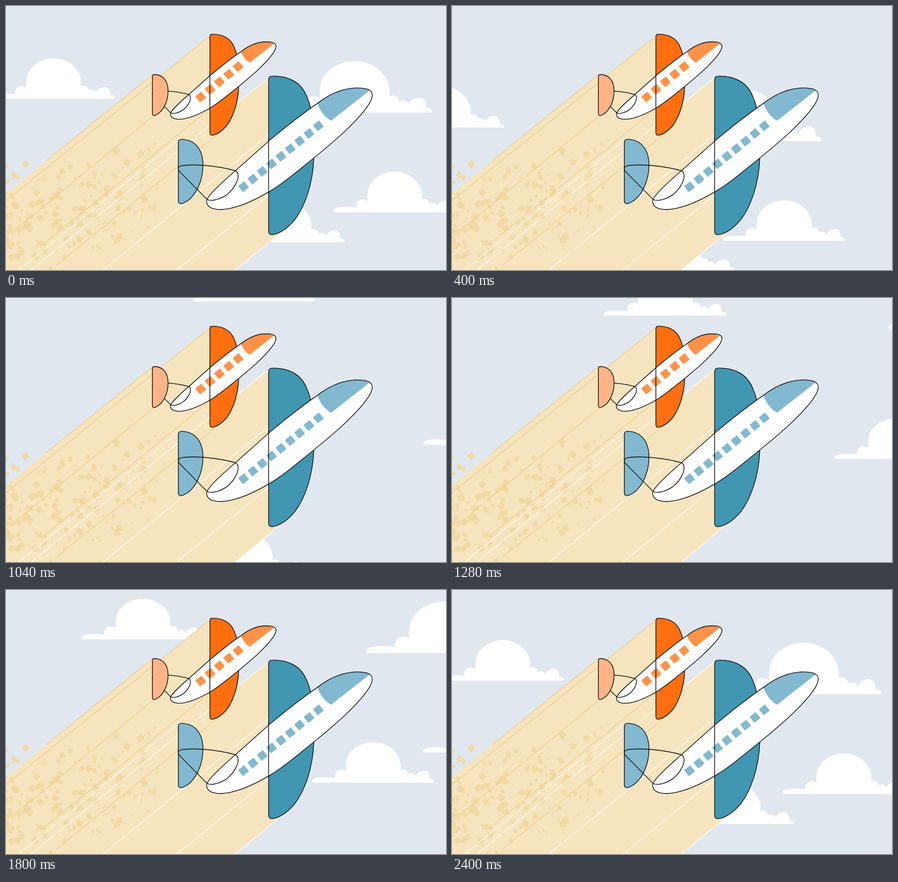
Write an HTML page that moves like this. It is 965x580 px and loops after 2.44 s.

```html
<!DOCTYPE html>
<html lang="en">
<head>
<meta charset="utf-8">
<title>Two planes</title>
<style>
  html, body { margin: 0; width: 100%; height: 100%; overflow: hidden; background: #e0e7ef; }
  svg { display: block; width: 965px; height: 580px; }
  .ink { fill: none; stroke: #111; stroke-linejoin: round; stroke-linecap: round; }
</style>
</head>
<body>
<svg viewBox="0 0 965 580">
  <defs>
    <path id="cloud" fill="#fff" d="M2,0C-1,-1 -1,-6 4,-8C14,-13 36,-12 50,-10C49,-22 56,-29 65,-28Q72,-28 75,-24
      C74,-32 74,-36 75,-42C76,-68 104,-89 135,-89C168,-89 195,-64 195,-36L194,-28C200,-31 210,-29 211,-19
      C217,-22 225,-21 227,-14C231,-22 240,-26 247,-26C256,-25 259,-16 258,-8C264,-9 268,-6 268,-3Q268,0 265,0Z"/>
    <path id="wing" d="M576,162Q576,154 584,154C620,153 647,168 659,197Q665,210 668,224L675,335
      C673,390 656,440 633,470C616,490 601,499 587,502Q576,504 576,494Z"/>
    <path id="tail" d="M378,300Q378,293 385,293C412,293 432,312 432,350C432,383 416,424 386,434Q378,436 378,427Z"/>
    <path id="strut" d="M503,362C470,352 415,346 384,351Q374,355 380,363L443,427"/>
    <path id="body" d="M441,425C447,412 470,391 503,362L577,296C620,260 655,233 683,214C712,191 748,176 785,181
      C800,183 806,190 802,203C796,222 765,255 735,283C715,301 695,318 675,334C640,362 608,390 577,408
      C545,427 515,440 490,445C470,449 445,448 441,434Q439,430 441,425Z"/>
    <path id="nose" d="M683,214C712,191 748,176 785,181Q794,183 797,186L713,252Q692,240 683,214Z"/>
    <path id="seams" d="M441,425C450,430 470,425 485,414C500,402 509,384 509,374Q509,364 503,362M576,290V412"/>
  </defs>
  <g id="clouds"></g>
  <path fill="#f6e4be" d="M447,66L335,157L320,152L0,411V580H503L600,500V300L575,158L447,262Z"/>
  <g id="confetti" fill="#f0d9a3"></g>
  <g fill="none" stroke-width="1.5">
    <path stroke="#eecb85" d="M447,66L0,428M320,152L88,340M325,240L28,485M447,226L80,525M460,285L110,570"/>
    <path stroke="#fffaf0" stroke-width="1.8" d="M575,158L55,580M378,294L28,580M577,282L213,580M577,415L375,580M600,500L503,580"/>
  </g>
  <g id="planes"></g>
</svg>
<script>
const el = id => document.getElementById(id);
const use = (id, attrs = '') => `<use href="#${id}" ${attrs}/>`;
const repeat = (count, draw) => Array.from({ length: count }, (_, i) => draw(i)).join('');
const square = (x, y, size, angle) =>
  `<rect x="${-size / 2}" y="${-size / 2}" width="${size}" height="${size}" transform="translate(${x} ${y}) rotate(${angle})"/>`;

// Clouds: one tile of sky, repeated one loop further along the flight path
const LOOP = 2440, STEP = 40, TILE = [769, -347.5];
const sky = [[-30, 204, 1], [594, 234, 1.27], [718, 453, 1], [475, 519, 1]];
el('clouds').innerHTML = repeat(2, n => sky.map(([x, y, scale]) =>
  use('cloud', `transform="translate(${x + n * TILE[0]} ${y + n * TILE[1]}) scale(${scale})"`)).join(''));

// Confetti: thins out along the trail, densest around its middle
let seed = 11;
const random = () => (seed = seed * 16807 % 2147483647) / 2147483647;
el('confetti').innerHTML = repeat(170, () => {
  const x = 340 * random() ** 1.5;
  const y = 475 - x * .2 + (random() + random() - 1) * 130;
  return square(x, y, 4 + 10 * random() ** 1.5, 90 * random());
});

function plane({ wing, light, tail, windows: { x, y, count }, dx = 0, dy = 0, scale = 1, tailOnTop }) {
  const rear = [use('tail', `fill="${tail}"`), use('strut')];
  if (tailOnTop) rear.reverse();
  const layer = content => `<g class="ink" stroke-width="${1.6 / scale}"
    transform="translate(${dx} ${dy}) scale(${scale})">${content}</g>`;
  return layer(use('wing', `fill="${wing}"`) + rear.join('') + use('body', 'fill="#fff" stroke="none"') +
      use('nose', `fill="${light}" stroke="none"`)) +
    `<g fill="${light}">${repeat(count, i => square(x + i * 20.5, y - i * 16.7, 17, -39))}</g>` +
    layer(use('body') + use('seams'));
}
el('planes').innerHTML =
  plane({ wing: '#ff6f0f', light: '#ff9249', tail: '#ffb488', windows: { x: 427, y: 200, count: 5 },
    dx: 80.3, dy: -36, scale: .637, tailOnTop: true }) +
  plane({ wing: '#4196b2', light: '#82b9d0', tail: '#82b9d0', windows: { x: 521, y: 397, count: 9 } });

// The sky drifts down and left on a slightly bowed path
function draw(now) {
  const t = Math.floor(now % LOOP / STEP) * STEP, u = t / LOOP;
  const x = -t * (.3184 - .0217 * (u - .787) ** 2);
  const y = t * (.1398 + .052 * (u - .748) ** 2);
  el('clouds').setAttribute('transform', `translate(${x} ${y})`);
  requestAnimationFrame(draw);
}
draw(performance.now());
</script>
</body>
</html>
```
